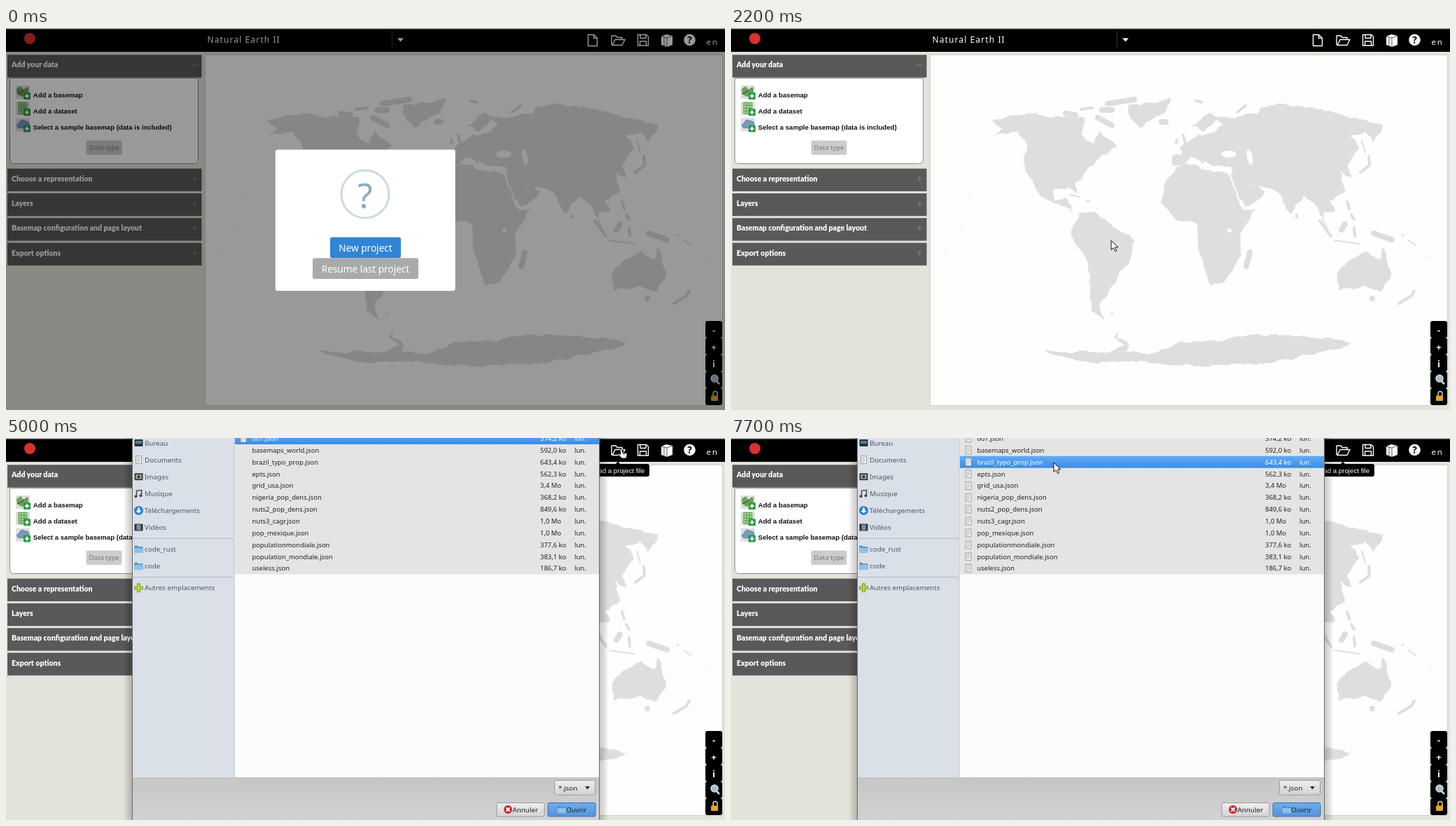
An HTML page for the animation above (8 s loop, 1027 by 545 pixels).

```html
<!DOCTYPE html>
<html lang="en">
<head>
<meta charset="utf-8">
<style>
html, body { margin: 0; width: 100%; height: 100%; overflow: hidden; background: #e3e3da; }
svg { display: block; width: 100vw; height: 100vh; }
text { font-family: "Noto Sans", "Open Sans", sans-serif; white-space: pre; }
.head { font: 900 10.5px Lato, sans-serif; fill: #fff; }
.add { font: 700 9.6px "Liberation Sans", Arial, sans-serif; fill: #111; }
.tip { font: 9.7px "Liberation Sans", Arial, sans-serif; fill: #fff; }
.mid { text-anchor: middle; }
.file { font-size: 9.45px; fill: #222; }
.label { font-size: 9.8px; fill: #222; }
.place { font-size: 9.8px; fill: #4b5563; }
.line { fill: none; stroke: #fff; stroke-width: 1.4; stroke-linejoin: round; }
.cursor { fill: #fff; stroke: #111; stroke-linejoin: round; }
#land { fill: #dedede; stroke: #dedede; stroke-width: .6; stroke-linejoin: round; stroke-linecap: round; }
</style>
</head>
<body>
<svg viewBox="0 0 1027 545" preserveAspectRatio="none">
  <defs>
    <linearGradient id="blue" x2="0" y2="1"><stop stop-color="#61abf5"/><stop offset="1" stop-color="#3b8de4"/></linearGradient>
    <linearGradient id="open" x2="0" y2="1"><stop stop-color="#6cacee"/><stop offset="1" stop-color="#5594da"/></linearGradient>
    <linearGradient id="bar" x2="0" y2="1"><stop stop-color="#c6c6c6"/><stop offset="1" stop-color="#d2d2d2"/></linearGradient>
    <linearGradient id="button" x2="0" y2="1"><stop stop-color="#eee"/><stop offset="1" stop-color="#d4d4d4"/></linearGradient>
    <g id="folder"><path d="M-6-5h4l1 1.5h7V5H-6z" fill="#4b8fc4"/><path d="M-6-2H6V5H-6z" fill="#8fc1e8"/></g>
    <g id="sheet"><path d="M-4-5.5h8v11h-8z" fill="#f4f4f4" stroke="#8a8a8a" stroke-width=".8"/><path d="M-2.5-3h5M-2.5-1h4M-2.5 1h5M-2.5 3h3" stroke="#a79a9a" stroke-width=".8"/></g>
    <g id="plus"><rect width="10" height="10" rx="1.5" fill="#259b3e"/><path d="M5 2v6M2 5h6" stroke="#fff" stroke-width="1.8"/></g>
  </defs>

  <rect width="1027" height="545" fill="#e3e3da"/>
  <rect width="1027" height="34"/>
  <rect width="1027" height="1.4" fill="#c5cac4"/>
  <circle cx="34" cy="15" r="8" fill="#d8322c"/>
  <text x="287.500" y="21" font-size="12" letter-spacing="1.1" fill="#fff">Natural Earth II</text>
  <path d="M551.500 4v24" stroke="#3a3a3a"/>
  <path d="M559 14.500h9l-4.500 5z" fill="#fff"/>
  <g class="line">
    <path d="M831.500 9.500h8l5 5V25.500h-13zM839.500 9.500v5h5"/>
    <path d="M868 24.500l-3-1V11h6l2 2.500h7v3M866 24.500l4-8h14l-4 8z"/>
    <path d="M902.500 9.500h12l3 3V25h-15zM906 9.500v5h8v-5M905.500 25v-6h9v6"/>
  </g>
  <path d="M936 12l7-3 9 2v13l-8 3-8-3z" fill="#fff"/>
  <path d="M936 12l8 2 8-3M944 14v13M940 13v13" fill="none" stroke="#333" stroke-width=".8"/>
  <circle cx="976.500" cy="17" r="8.300" fill="#fff"/>
  <text class="mid" x="976.500" y="22" font-size="14" font-weight="800">?</text>
  <text x="1000.500" y="24" font-size="11.5" font-weight="500" letter-spacing="1.8" fill="#fff">en</text>

  <g id="panels"></g>
  <path d="M5.500 71.500h269V188q0 5.500-6 5.500H11.500q-6 0-6-5.500z" fill="#fff" stroke="#8c8c8c"/>
  <g id="adds"></g>
  <rect x="114.500" y="160.500" width="51" height="20.500" rx="2.500" fill="#ccc"/>
  <text class="mid" x="140" y="174.300" font-size="9.6" fill="#777">Data type</text>

  <rect x="284.500" y="38.500" width="739" height="500" fill="#fefefe" stroke="#d2d2cc"/>
  <g id="land"></g>
  <g fill="#fefefe">
    <ellipse cx="711" cy="180" rx="11" ry="5"/>
    <ellipse cx="741" cy="184" rx="4" ry="11" transform="rotate(-12 741 184)"/>
    <circle cx="712" cy="289" r="3"/>
  </g>
  <g id="tools"></g>

  <g id="prompt">
    <rect y="2" width="1027" height="543" opacity=".4"/>
    <g id="box">
      <rect x="384.700" y="173.500" width="257" height="201.500" rx="3.500" fill="#fff"/>
      <circle cx="513" cy="237" r="34" fill="none" stroke="#c9dae1" stroke-width="3"/>
      <text class="mid" x="513" y="256.500" font-size="49" fill="#87adbd">?</text>
      <rect id="fresh" x="463" y="298.500" width="101" height="29.700" rx="3"/>
      <rect x="438" y="328.200" width="151" height="29.700" rx="3" fill="#aaa"/>
      <g class="mid" font-size="13.6" fill="#fff"><text x="513.500" y="318.700">New project</text><text x="513.500" y="348.500">Resume last project</text></g>
    </g>
  </g>

  <g id="tip">
    <path d="M870.500 37.500l3.500-4 3.500 4z"/>
    <rect x="828.500" y="37" width="90.500" height="18" rx="3"/>
    <text class="tip mid" x="873.800" y="49.700">Load a project file</text>
  </g>

  <g id="dialog">
    <g id="shade"></g>
    <rect x="180.500" y="-9" width="667" height="570" fill="#fff" stroke="#6e6e6e"/>
    <rect x="181" width="145" height="484" fill="#dae0e7"/>
    <path d="M181 143.500h144M181 198.500h144" stroke="#b4bac2"/>
    <path d="M326 0v484" stroke="#bcc0c6"/>
    <rect x="327" width="520" height="484" fill="#fcfcfc"/>
    <rect x="327" width="520" height="194.500" fill="#e4e4e4"/>
    <rect id="pick" x="327" width="520" height="17" fill="url(#blue)"/>
    <g id="places"></g>
    <g id="files"></g>
    <rect x="181" y="484" width="666" height="61" fill="url(#bar)"/>
    <g stroke="#9a9a9a" fill="url(#button)">
      <rect x="783.500" y="488.500" width="58" height="20.500" rx="2"/>
      <rect x="701" y="520.500" width="68" height="19.500" rx="2"/>
      <rect x="774" y="520.500" width="68" height="19.500" rx="2" fill="url(#open)" stroke="#3d6fa8"/>
    </g>
    <path d="M827 497h7l-3.500 4.500z" fill="#333"/>
    <circle cx="717" cy="530" r="6" fill="#d2282e"/>
    <path d="M714.500 527.500l5 5m0-5l-5 5" stroke="#fff" stroke-width="2"/>
    <use href="#folder" x="794" y="530"/>
    <g class="label"><text x="789" y="502.500">*.json</text><text x="723.500" y="533.700">Annuler</text><text x="800" y="533.700">Ouvrir</text></g>
  </g>

  <path id="arrow" class="cursor" d="M0 0V13.500L3.300 10.600 5.600 15.600 7.900 14.600 5.700 9.800H10z"/>
  <g id="hand" class="cursor">
    <path d="M-1.500 1q1.500-2.500 3 0v3.500l5.500 1q1.500.5 1 3l-1 4.500h-6.500l-5.500-6q1-1.500 3.500.5z"/>
    <path d="M3 5v2.500M5 5.500v2"/>
  </g>
</svg>
<script>
const $ = id => document.getElementById(id);
const fill = (id, list, make) => $(id).innerHTML = list.map(make).join('');
const show = (id, on) => $(id).style.display = on ? '' : 'none';

fill('panels', ['Add your data', 'Choose a representation', 'Layers', 'Basemap configuration and page layout', 'Export options'],
  (name, i) => `<g transform="translate(0 ${i ? 165.3 + 35.3 * i : 38.3})"><rect x="2" width="277.500" height="32.300" fill="#595959"/>
  <text class="head" x="8" y="18">${name}</text><path d="M265.500 14.500h8${i ? 'm-4-4v8' : ''}" stroke="#828282"/></g>`);

const addIcons = [
  '<path d="M1 5l6-4 5 6 6-5v11L8 16 2 12z" fill="#6fa25a"/><path d="M2 12Q9 10 16 3" fill="none" stroke="#263b22"/>',
  '<path d="M4 1h12v16H4z" fill="#a7d297" stroke="#5d9c4c"/><path d="M4 5h12M4 9h12M4 13h12M8 1v16M12 1v16" stroke="#5d9c4c"/>',
  '<path d="M4 14Q-1 10 5 7 7 0 13 4q7 0 6 7 0 3-4 3z" fill="#7699c4" stroke="#6584ac"/>'
];
fill('adds', ['Add a basemap', 'Add a dataset', 'Select a sample basemap (data is included)'],
  (name, i) => `<g transform="translate(14 ${82 + i * 23.3})"><rect width="20" height="19" fill="#dededc"/>${addIcons[i]}
  <use href="#plus" x="11" y="10"/><text class="add" x="24.800" y="16.600">${name}</text></g>`);

// Coastlines: a few key points, roughened by seeded midpoint shifts
let seed = 7;
const random = () => (seed = seed * 16807 % 2147483647) / 2147483647 - .5;
function rough([ax, ay], [bx, by]) {
  const dx = bx - ax, dy = by - ay, length = Math.hypot(dx, dy);
  if (length < 4) return [[bx, by]];
  const shift = random() * Math.min(.28, 5 / length);
  const mid = [(ax + bx) / 2 - dy * shift, (ay + by) / 2 + dx * shift];
  return [...rough([ax, ay], mid), ...rough(mid, [bx, by])];
}
function coast(keys) {
  const points = keys.split(', ').map(p => p.split(' ').map(Number));
  return `<polygon points="${points.flatMap((p, i) => rough(p, points[(i + 1) % points.length])).join(' ')}"/>`;
}
fill('land', [
  // The Americas and Greenland
  '374 132, 424 122, 505 128, 500 152, 518 166, 526 147, 551 168, 528 182, 503 209, 491 222, 494 236, 484 227, 460 231, 460 248, 479 242, 488 264, 442 240, 421 205, 418 190, 424 168, 410 147, 376 153, 390 143',
  '497 264, 517 262, 545 283, 577 303, 568 337, 540 374, 526 395, 533 416, 515 404, 510 335, 486 297, 490 280',
  '568 110, 628 100, 618 122, 585 143, 572 130',
  // Africa
  '636 198, 664 195, 690 206, 709 208, 733 260, 749 258, 727 297, 728 325, 706 360, 686 367, 671 325, 666 279, 636 274, 614 250, 618 225',
  // Europe, Asia
  '631 196, 631 182, 645 181, 641 171, 667 152, 692 148, 704 138, 695 130, 684 140, 676 148, 658 140, 685 121, 711 129, 752 123, 790 108, 790 200, 716 200, 691 197, 667 181, 675 194, 656 183, 642 197',
  '756 114, 790 108, 850 119, 931 138, 917 163, 906 147, 884 153, 897 170, 880 197, 886 212, 870 203, 877 232, 855 247, 862 262, 846 262, 852 286, 838 256, 818 239, 801 265, 780 233, 741 222, 763 234, 735 255, 714 210, 716 196',
  // Australia, Antarctica
  '866 350, 888 329, 907 318, 927 330, 931 314, 943 349, 928 376, 905 367, 868 374',
  '449 461, 545 461, 563 452, 547 440, 553 434, 552 443, 568 452, 565 463, 605 464, 640 448, 728 441, 810 440, 885 450, 800 474, 650 479, 510 476'
], coast);

// Islands, as strokes of three widths
const islands = {
  2: 'M901 161l5 17M862 303l36 5M484 238l14 3M507 247h6M958 296l3-1M968 303l10 7M857 245h3M543 408h3M330 280h0M341 239h0M306 319h0M998 327h0',
  4: 'M911 183l1 13-13 10M646 153l3 12M637 160l-1 4M723 120l12-9M880 248l3 10M886 266l4 7M841 275l16 22M890 285l1 12M664 104l8 2M976 375l-4 7-18 11M808 267v3M500 116l16-2',
  8: 'M478 122l14 2M538 108l38-6M524 128l20 11M615 134h6M741 320l-5 20M872 288l5-8M918 293l26 9M916 386h0M530 117h14'
};
$('land').innerHTML += Object.entries(islands).map(([width, d]) => `<path d="${d}" fill="none" stroke-width="${width}"/>`).join('');

const lens = '<circle cx="1012" cy="500" r="5" fill="#9fc0d4" stroke="#ddd" stroke-width="1.5"/><path d="M1015 504l4 4" stroke="#ddd" stroke-width="2.5"/>';
const lock = '<path d="M1010 525v-3q0-3.500 3-3.500t3 3.500v3" fill="none" stroke="#d8d8c8" stroke-width="1.5"/><rect x="1007" y="524.500" width="10" height="7.500" rx="1" fill="#eaa41f"/>';
const sign = (mark, i) => `<text class="mid" x="1011" y="${435.5 + i * 24}" font-size="13" font-weight="700" fill="#fff">${mark}</text>`;
fill('tools', [...['-', '+', 'i'].map(sign), lens, lock],
  (mark, i) => `<rect x="999" y="${418 + i * 24}" width="24" height="24" rx="3"/>${mark}`);

// Soft window shadow
fill('shade', [...Array(12).keys()], i =>
  `<rect x="${168 + i}" y="-20" width="${692 - i * 2}" height="600" rx="8" opacity=".02"/>`);

const use = name => `<use href="#${name}"/>`;
const block = (colour, extra) => `<rect x="-6" y="-5" width="12" height="10" rx="1" fill="${colour}"/>${extra}`;
const placeY = i => 7 + 24.1 * i + (i > 5) * 7 + (i > 7) * 7; // separators add a gap
fill('places', [
  ['Bureau', block('#27323c', '<path d="M-4.500-3h9v4h-9z" fill="#547f9e"/>')],
  ['Documents', use('sheet')],
  ['Images', block('#3c3c3c', '<path d="M-4-3h8v6h-8z" fill="#aaa"/><circle r="2" fill="#333"/>')],
  ['Musique', '<path d="M-3 4v-8l7-1v7" fill="none" stroke="#444" stroke-width="1.5"/><circle cx="-4" cy="4" r="2" fill="#444"/><circle cx="3" cy="3" r="2" fill="#444"/>'],
  ['Téléchargements', '<circle r="6.500" fill="#2b83d2"/><path d="M-1.500-4h3v4h2.500l-4 4-4-4h2.500z" fill="#fff"/>'],
  ['Vidéos', block('#333', '<path d="M-3-4h6v8h-6z" fill="#7891a5"/>')],
  ['code_rust', use('folder')], ['code', use('folder')],
  ['Autres emplacements', '<path d="M-2-6h4v4h4v4h-4v4h-4v-4h-4v-4h4z" fill="#b5d43c" stroke="#6d8d20" stroke-width=".8"/>']
], ([name, icon], i) => `<g transform="translate(189.500 ${placeY(i)})">${icon}<text class="place" x="8.500" y="3.500">${name}</text></g>`);

const rowY = i => .5 + i * 16.86;
fill('files', [
  ['007', '374,2 ko'], ['basemaps_world', '592,0 ko'], ['brazil_typo_prop', '643,4 ko'], ['epts', '562,3 ko'],
  ['grid_usa', '3,4 Mo'], ['nigeria_pop_dens', '368,2 ko'], ['nuts2_pop_dens', '849,6 ko'], ['nuts3_cagr', '1,0 Mo'],
  ['pop_mexique', '1,0 Mo'], ['populationmondiale', '377,6 ko'], ['population_mondiale', '383,1 ko'], ['useless', '186,7 ko']
], ([name, size], i) => `<g class="file" transform="translate(0 ${rowY(i)})"><use class="icon" href="#sheet" x="339"/>
  <text x="351.500" y="3.500">${name}.json</text><text x="763" y="3.500">${size}</text><text x="812" y="3.500">lun.</text></g>`);
const rows = [...$('files').children], icons = document.querySelectorAll('.icon');

// Pointer moves: start, end, target x, y
const moves = [
  [300, 900, 546, 298], [1000, 1100, 543, 303], [2500, 3000, 893, 4],
  [3100, 3700, 879, 16], [5600, 6200, 623, 49], [6400, 7100, 461, 35]
];
function pointer(t) {
  let x = 575, y = 97;
  for (const [start, end, toX, toY] of moves) {
    const k = Math.min(1, Math.max(0, (t - start) / (end - start))), eased = k * (2 - k);
    x += (toX - x) * eased;
    y += (toY - y) * eased;
  }
  return `translate(${x} ${y})`;
}

function draw(now) {
  const t = Math.floor(now % 8000 / 100) * 100; // the screen ticks ten times a second
  const hand = t >= 1100 && t < 2200 || t >= 3300 && t < 5700;
  show('arrow', t >= 300 && !hand);
  show('hand', hand);
  for (const id of ['arrow', 'hand']) $(id).setAttribute('transform', pointer(t));

  show('prompt', t < 2200);
  const closing = t < 1900 ? 0 : t < 2000 ? .3 : .75;
  $('box').setAttribute('transform', `translate(513 274) scale(${1 - closing / 2}) translate(-513 -274)`);
  $('box').setAttribute('opacity', 1 - closing);
  $('fresh').setAttribute('fill', t >= 900 ? '#2b78c1' : '#3085d6');

  show('tip', t >= 3500);
  show('dialog', t >= 4800);
  $('dialog').setAttribute('opacity', Math.min(1, (t - 4700) / 250));
  const chosen = t < 7700 ? 0 : 2;
  $('pick').setAttribute('y', rowY(chosen) - 8.5);
  rows.forEach((row, i) => row.style.fill = i === chosen ? '#fff' : '');
  icons.forEach((icon, i) => icon.style.display = i && t < 5200 ? 'none' : '');
  requestAnimationFrame(draw);
}
requestAnimationFrame(draw);
</script>
</body>
</html>
```
